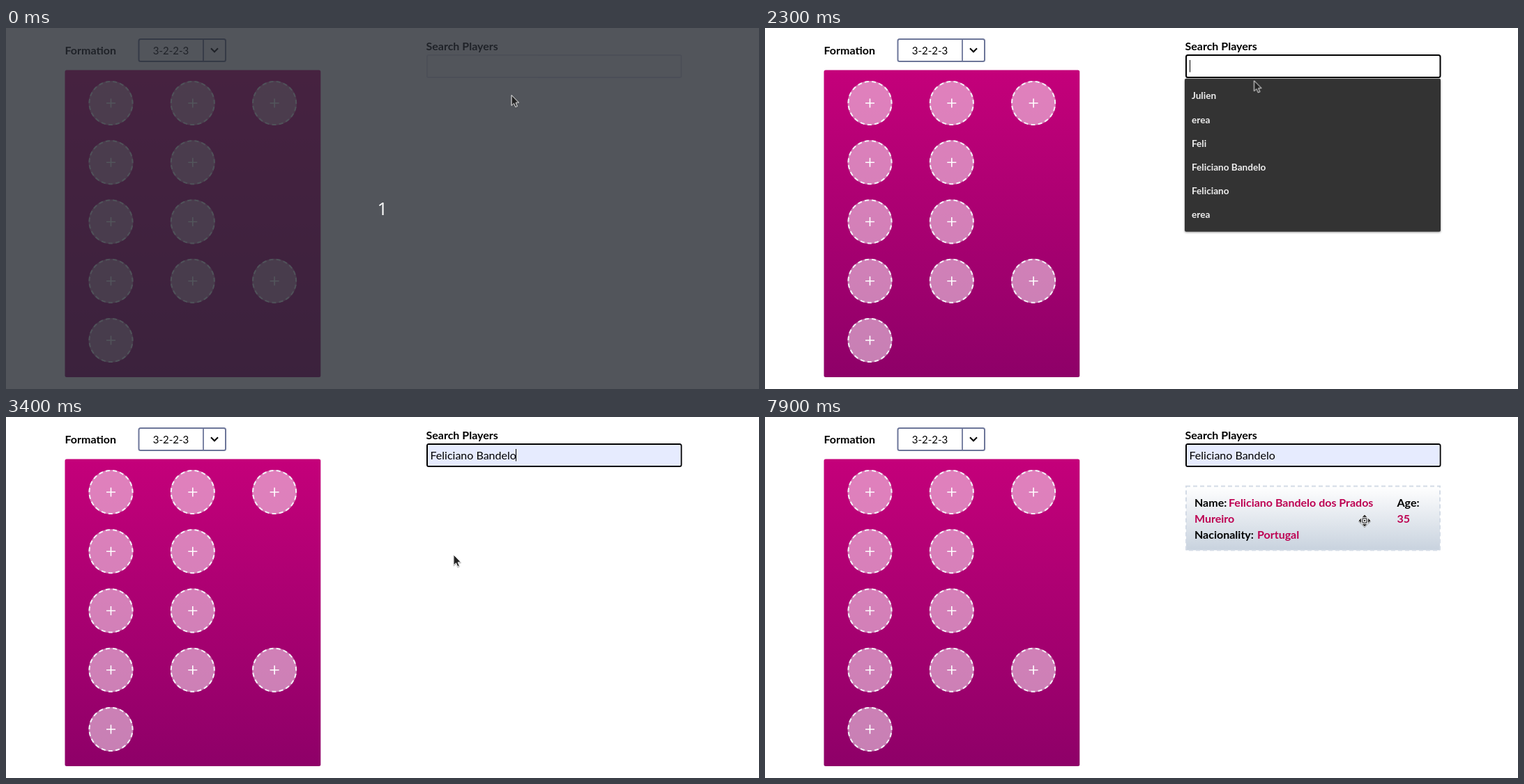
These frames come from a looping animation (1080x519 px, 8000 ms). An HTML page:

```html
<!DOCTYPE html>
<html lang="en">
<head>
<meta charset="utf-8">
<title>Team builder</title>
<style>
  html, body { margin: 0; width: 100%; height: 100%; overflow: hidden; background: #fff; }
  svg { display: block; width: 100vw; height: 100vh; }
  text { font: 16px Lato, "Open Sans", sans-serif; }
  .bold { font-weight: 700; }
  .pink { fill: #bd0051; }
  .item { font-size: 13.6px; font-weight: 700; fill: #eee; }
  .preview { font: 13.333px "Liberation Sans", Arial, sans-serif; }
  .count { font: 26px "Open Sans", "Noto Sans", sans-serif; fill: #fff; text-anchor: middle; }
  .menu { filter: drop-shadow(0 1px 1.5px rgba(0, 0, 0, .45)); }
  .pointer { filter: drop-shadow(.5px 1px .7px rgba(0, 0, 0, .35)); }
</style>
</head>
<body>
<svg viewBox="0 0 1080 519" xmlns="http://www.w3.org/2000/svg">
  <defs>
    <linearGradient id="pitch" x2="0" y2="1">
      <stop stop-color="#c4007a"/><stop offset="1" stop-color="#8e0068"/>
    </linearGradient>
    <linearGradient id="steel" x2="0" y2="1">
      <stop stop-color="#fff"/><stop offset="1" stop-color="#c8d2de"/>
    </linearGradient>
    <g id="slot">
      <circle r="32" fill="#fff" fill-opacity=".5"/>
      <circle r="31" fill="none" stroke="#f3f1f7" stroke-width="2" stroke-dasharray="6 4.25" transform="rotate(180)"/>
      <path d="M-6.5 0h13M0 -6.5v13" stroke="#fff" stroke-width="1.6"/>
    </g>
    <path id="ibeam" d="M-3 -7.5h2l1 1 1-1h2M-3 7.5h2l1-1 1 1h2M0 -6.5v13" fill="none"/>
  </defs>
  <rect width="1080" height="519" fill="#fff"/>

  <text class="bold" x="84.5" y="38">Formation</text>
  <rect x="190.5" y="16" width="124.5" height="32" rx="2.5" fill="#fff" stroke="#6d7699" stroke-width="2"/>
  <path d="M283 16v32" stroke="#6d7699" stroke-width="1.8"/>
  <text x="236.5" y="38" text-anchor="middle" style="font-size:15px">3-2-2-3</text>
  <path d="M294 29.3l5 5 5-5" fill="none" stroke="#000" stroke-width="2"/>

  <rect x="84.5" y="60.5" width="366.8" height="441.5" rx="2.5" fill="url(#pitch)"/>
  <g id="slots"></g>

  <text class="bold" x="602.5" y="32">Search Players</text>
  <rect x="604" y="39" width="364.5" height="32" rx="2" fill="#fff" stroke="#dfdfeb" stroke-width="2"/>
  <g id="focus">
    <rect x="604" y="39" width="364.5" height="32" rx="2.5" fill="#fff" stroke="#000" stroke-width="2"/>
    <rect id="tint" x="605" y="40" width="362.5" height="30" rx="1" fill="#e6ebfe"/>
  </g>
  <g id="previews"></g>
  <text id="query" x="608.5" y="61"></text>
  <rect id="caret" y="46" width="1" height="17.5"/>

  <g id="card">
    <rect x="604" y="99.5" width="364" height="92" fill="url(#steel)"/>
    <rect x="604" y="99.5" width="364" height="92" fill="none" stroke="#d3dbe6" stroke-width="2" stroke-dasharray="6 4"/>
    <text class="bold" x="616" y="129">Name:</text>
    <text class="bold pink" x="665" y="129">Feliciano Bandelo dos Prados</text>
    <text class="bold pink" x="616" y="151.5">Mureiro</text>
    <text class="bold" x="616" y="174.5">Nacionality:</text>
    <text class="bold pink" x="706" y="174.5">Portugal</text>
    <text class="bold" x="906.5" y="129">Age:</text>
    <text class="bold pink" x="906.5" y="151.5">35</text>
  </g>

  <g id="menu" class="menu">
    <rect x="602" y="72.7" width="367" height="220" rx="2" fill="#333"/>
  </g>

  <g id="overlay">
    <rect width="1080" height="519" fill="#272b33" fill-opacity=".8"/>
    <text class="count" x="540" y="269">1</text>
  </g>

  <g id="cursor">
    <path id="arrow" class="pointer" d="M0 0V15.2L3.5 11.9 5.8 17.2 8.4 16.1 6.1 10.9H10.6Z" fill="#222" stroke="#fff"/>
    <g id="beam">
      <use href="#ibeam" stroke="#fff" stroke-width="2.6"/>
      <use href="#ibeam" stroke="#222" stroke-width="1.1"/>
    </g>
    <g id="move" class="pointer">
      <path d="M0 -9L4 -4.6H-4ZM0 9L4 4.6H-4ZM-9 0L-4.6 -4V4ZM9 0L4.6 -4V4Z" fill="#2b2b2b" stroke="#fff" stroke-width=".8"/>
      <rect x="-3" y="-3" width="6" height="6" rx="1.5" fill="#fff" stroke="#333" stroke-width="1.1"/>
      <circle r="1.3" fill="#333"/>
    </g>
  </g>
</svg>
<script>
const LOOP = 8000, TICK = 100;
const OPEN = 1000, PICK = 3200, RESULT = 5900;
const MENU_TOP = 72.7, ROW_TOP = 80.4, ROW = 34.1, CARD_BOTTOM = 192.5;

const $ = id => document.getElementById(id);
const clamp = v => Math.min(1, Math.max(0, v));
const ease = k => k * k * (3 - 2 * k);

function add(parent, tag, attrs, label = '') {
  const el = document.createElementNS('http://www.w3.org/2000/svg', tag);
  for (const key in attrs) el.setAttribute(key, attrs[key]);
  el.textContent = label;
  return parent.appendChild(el);
}

// Samples a rule of time once per tick; each value holds until the next.
function track(el, prop, rule) {
  const frames = [];
  for (let ms = 0; ms <= LOOP; ms += TICK)
    frames.push({ offset: ms / LOOP, [prop]: rule(Math.min(ms, LOOP - TICK)), easing: 'steps(1)' });
  el.animate(frames, { duration: LOOP, iterations: Infinity });
}
const fade = (el, rule) => track(el, 'opacity', ms => Number(rule(ms)));

// Pointer strokes: first and last step, and where each one ends.
const strokes = [
  { from: 400, to: 500, x: 712.5, y: 53 },
  { from: 2200, to: 2900, x: 642, y: 198 },
  { from: 4400, to: 4400, x: 642, y: 194 },
  { from: 6200, to: 7000, x: 907, y: 139 },
  { from: 7100, to: 7600, x: 874.5, y: 144.5 },
  { from: 7900, to: 7900, x: 860, y: 149 }
];

function pointer(ms) {
  let x = 725, y = 96.5;
  for (const s of strokes) {
    if (ms < s.from) break;
    const k = ease(clamp((ms - s.from + TICK) / (s.to - s.from + TICK)));
    x += (s.x - x) * k;
    y += (s.y - y) * k;
  }
  return { x, y };
}

function shape(ms) {
  const { y } = pointer(ms);
  if (ms >= RESULT && y < CARD_BOTTOM) return 'move';
  return y < MENU_TOP ? 'beam' : 'arrow';
}

const menuAlpha = ms => ms < OPEN ? 0 : clamp((PICK + 200 - ms) / 300);
const hovered = ms => menuAlpha(ms) ? Math.floor((pointer(ms).y - ROW_TOP) / ROW) : -1;

function caretOn(ms) {
  if (ms < OPEN || (ms < PICK && hovered(ms) >= 0)) return false;
  return Math.floor((ms - (ms < PICK ? OPEN : PICK)) / 600) % 2 === 0;
}

[3, 2, 2, 3, 1].forEach((count, row) => {
  for (let col = 0; col < count; col++)
    add($('slots'), 'use', { href: '#slot', x: 150.5 + col * 117.3, y: 108 + row * 85.25 });
});

const player = 'Feliciano Bandelo';
$('query').textContent = player;

['Julien', 'erea', 'Feli', player, 'Feliciano', 'erea'].forEach((name, i) => {
  const y = ROW_TOP + i * ROW;
  const bar = add($('menu'), 'rect', { x: 602, y, width: 367, height: ROW, fill: '#505050' });
  const preview = add($('previews'), 'text', { class: 'preview', x: 608.5, y: 61 }, name);
  add($('menu'), 'text', { class: 'item', x: 612, y: y + 22 }, name);
  fade(bar, ms => hovered(ms) === i);
  fade(preview, ms => ms < PICK && hovered(ms) === i);
});

fade($('overlay'), ms => ms < TICK);
fade($('focus'), ms => ms >= OPEN);
fade($('tint'), ms => ms >= PICK || hovered(ms) >= 0);
fade($('query'), ms => ms >= PICK);
fade($('card'), ms => ms >= RESULT);
fade($('menu'), menuAlpha);
fade($('caret'), caretOn);
track($('caret'), 'transform', ms => `translate(${ms < PICK ? 609 : 731}px, 0px)`);

track($('cursor'), 'transform', ms => {
  const { x, y } = pointer(ms);
  return `translate(${x}px, ${y}px)`;
});
for (const kind of ['arrow', 'beam', 'move']) fade($(kind), ms => shape(ms) === kind);
</script>
</body>
</html>
```
